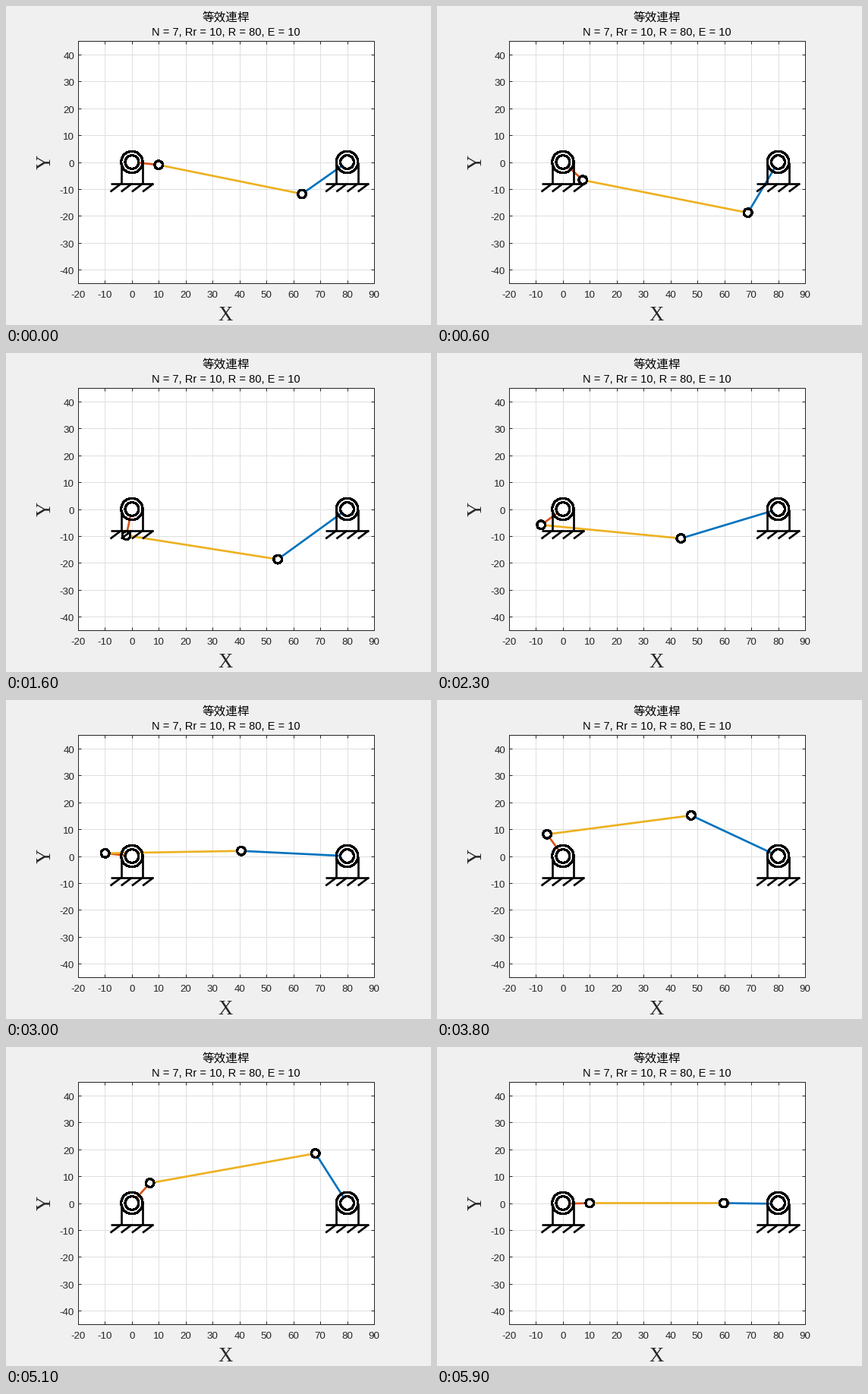
These frames come from a looping animation (560 by 420 pixels, 6000 ms). A matplotlib script:

```python
import numpy as np
import matplotlib.pyplot as plt
from matplotlib.animation import FuncAnimation
from matplotlib.patches import Circle

W, H, DPI = 560, 420, 100
PX = 72 / DPI                      # points per pixel
N, RR, R, E = 7, 10, 80, 10        # pins, pin radius, pin circle, eccentricity
FRAMES, STEP = 60, 100
INK = "#262626"
BLUE, ORANGE, YELLOW = "#0072BD", "#D95319", "#EDB120"
LEFT, RIGHT, TOP, BOTTOM = 95, 485, 46, 365

fig = plt.figure(figsize=(W / DPI, H / DPI), dpi=DPI, facecolor="#f0f0f0")
ax = fig.add_axes([LEFT / W, 1 - BOTTOM / H, (RIGHT - LEFT) / W, (BOTTOM - TOP) / H])
ax.set(xlim=(-20, 90), ylim=(-45, 45),
       xticks=range(-20, 91, 10), yticks=range(-40, 41, 10))
ax.set_axisbelow(True)
ax.grid(color="#dfdfdf", lw=1 * PX)
ax.tick_params(direction="in", length=4 * PX, width=1 * PX, color=INK,
               top=True, right=True, labelbottom=False, labelleft=False)
for spine in ax.spines.values():
    spine.set(linewidth=1 * PX, color=INK, zorder=10)


def label(x, y, text, size, font="Liberation Sans", color=INK, **kw):
    """Text at pixel coordinates measured from the top left corner."""
    kw = {"ha": "center", "va": "baseline", **kw}
    fig.text(x / W, 1 - y / H, text, fontsize=size * PX, family=font, color=color, **kw)


for v in ax.get_xticks():
    label(LEFT + (v + 20) / 110 * (RIGHT - LEFT), 384.5, f"{v:.0f}", 13.33)
for v in ax.get_yticks():
    label(90, TOP + (45 - v) / 90 * (BOTTOM - TOP) + 6, f"{v:.0f}", 13.33, ha="right")
label(289.5, 19.3, "等效連桿", 15.6, "Noto Sans CJK JP", "black")
label(290, 39, f"N = {N}, Rr = {RR}, R = {R}, E = {E}", 14.67, color="black")
label(289.5, 413.5, "X", 26.67, "Liberation Serif")
label(65, 205.5, "Y", 26.67, "Liberation Serif", rotation=90, ha="right", va="center")


def bar(color, z):
    return ax.plot([], [], color=color, lw=2.67 * PX, zorder=z, solid_capstyle="butt")[0]


def ring(x, y, radius, z, fill="white"):
    return ax.add_patch(Circle((x, y), radius, fc=fill, ec="black", lw=2.2 * PX,
                               zorder=z, antialiased=False))


def pivot(x):
    """Fixed bearing on hatched ground."""
    segments = [((-4, -4), (0, -8)), ((4, 4), (0, -8)), ((-8, 8), (-8, -8))]
    segments += [((h, h - 4), (-8, -11)) for h in (-4, 0, 4, 8)]
    for xs, ys in segments:
        ax.plot([x + v for v in xs], ys, color="black", lw=2.67 * PX, zorder=6,
                solid_capstyle="butt")
    ring(x, 0, 4, 7, "none")
    ring(x, 0, 2.5, 8)


rocker, crank, coupler = bar(BLUE, 3), bar(ORANGE, 3.1), bar(YELLOW, 3.2)
crank_pin, rocker_pin = ring(0, 0, 1.5, 5), ring(0, 0, 1.5, 5)
pivot(0)
pivot(R)


def joints(phi):
    """Crank pin and centre of curvature of the disc profile."""
    axis = np.array([np.cos(phi), np.sin(phi)])
    pin = np.array([R, 0.0])
    to_pin = pin - N * E * axis            # from the pitch point
    dist = np.hypot(*to_pin)
    unit = to_pin / dist
    # Euler-Savary for centrodes of radius N*E and (N-1)*E
    k = dist * (1 / ((N - 1) * E) - 1 / (N * E))
    rho = dist * k / (k - unit @ axis)
    length = abs(rho - RR) + RR
    return E * axis, pin - length * unit


def update(i):
    a, b = joints(-2 * np.pi * (i + 1) / FRAMES)
    crank.set_data([0, a[0]], [0, a[1]])
    coupler.set_data([a[0], b[0]], [a[1], b[1]])
    rocker.set_data([R, b[0]], [0, b[1]])
    crank_pin.center = tuple(a)
    rocker_pin.center = tuple(b)
    return rocker, crank, coupler, crank_pin, rocker_pin


anim = FuncAnimation(fig, update, frames=FRAMES, interval=STEP, repeat=True, repeat_delay=0)
plt.show()
```
